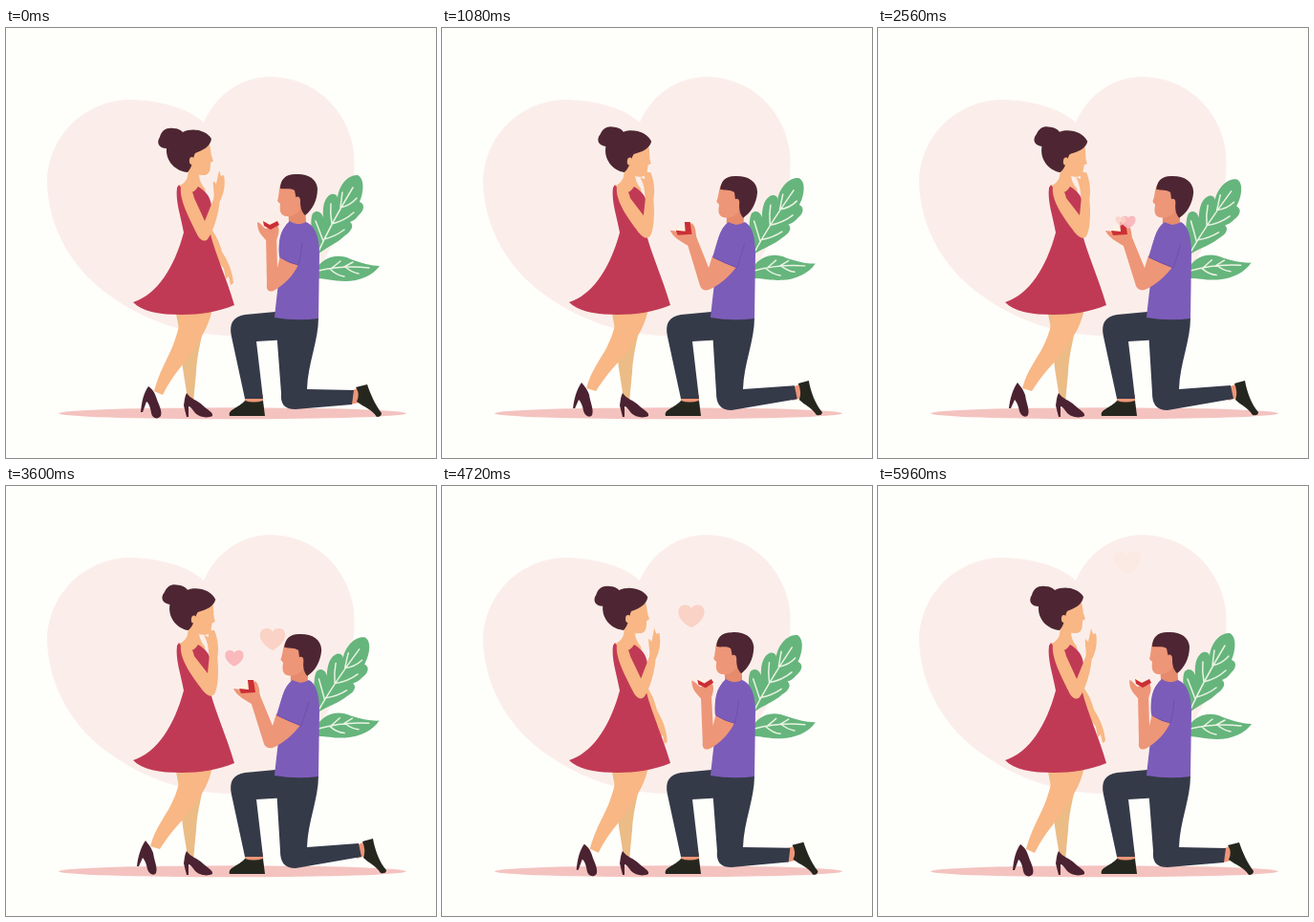
Write an HTML page that moves like this. It is 450x450 px and loops after 6000 ms.

```html
<!DOCTYPE html>
<html lang="en">
<head>
<meta charset="utf-8">
<title>Proposal</title>
<style>
  html, body { margin: 0; width: 100%; height: 100%; overflow: hidden; background: #fefefb; }
  svg { display: block; width: 100vw; height: 100vh; }
  .hair { fill: #4e2633; }
  .heel { fill: #4b2231; }
  .her { fill: #f8b784; }
  .him { fill: #ee9678; }
  .dress { fill: #c13a55; }
  .pants { fill: #353a49; }
  .shoe { fill: #25271f; }
  .shirt { fill: #7c5cb9; }
  .leaf { fill: #66b57c; }
  .vein { fill: none; stroke: #e9f3e2; stroke-width: 1.5; stroke-linecap: round; }
</style>
</head>
<body>
<svg viewBox="0 0 450 450">
  <path fill="#fbeeea" d="M207 99C190 83 158 75 127 75C80 77 43 115 43 163C45 213 72 255 110 281C145 306 188 321 235 322C282 314 323 268 348 214C359 188 367 160 364 130C358 84 321 51 276 51C242 52 218 73 207 99Z"/>
  <ellipse cx="237" cy="403.3" rx="182" ry="6" fill="#f4c3bf"/>

  <g id="leafTop">
    <path class="leaf" d="M326 237C321 222 317 202 321 194C326 189 331 194 332 198C331 185 334 177 340 174C344 173 347 175 347 178C348 165 358 153 368 154C376 158 374 173 370 182C376 184 375 191 369 196C366 200 363 202 360 203C365 207 361 213 355 217C347 225 336 229 326 237Z"/>
    <path class="vein" d="M326 236Q340 205 363 167M332 223Q328 212 324 202M341 205Q339 194 340 184M350 188Q351 179 352 172M333 221Q345 218 354 211M341 205Q354 202 364 193M350 188Q360 186 367 178"/>
  </g>
  <g id="leafLow">
    <path class="leaf" d="M326 250C335 238 349 236 361 242C372 246 382 249 391 249C384 259 370 265 355 265C342 265 334 262 326 262Z"/>
    <path class="vein" d="M327 254Q352 248 380 251M340 252L350 244M354 250L363 245M339 252Q346 259 354 260M355 250Q362 256 369 257"/>
  </g>

  <!-- man -->
  <path class="him" d="M250 384H269V393H250Z"/>
  <path class="him" id="ankle"/>
  <path class="shoe" id="backShoe"/>
  <path class="pants" id="backLeg"/>
  <path class="pants" d="M282 297L250 300C238 302 233 309 236 323L250 388H269L262 328L296 326L327 304Z"/>
  <path class="shoe" d="M250 390Q259 393 269 390L271 406L234 406C232 399 243 398 250 390Z"/>
  <g id="hisHead">
    <path fill="#e68b6c" d="M295 182L313 180L314 204Q304 211 296 203Z"/>
    <path class="him" d="M287 164C285 172 286 175 284 181L287 184C286 191 287 196 293 197C301 198 307 193 310 186L316 172L306 160Z"/>
    <path class="hair" d="M287 168C287 159 292 153 303 153C315 152 325 157 326 168C326 181 320 191 313 196C309 192 308 187 308 182L304 180L302 170C297 167 292 169 287 168Z"/>
    <ellipse class="him" cx="305" cy="181" rx="3" ry="4.5"/>
  </g>
  <path class="shirt" id="shirt"/>
  <path class="him" id="hisArm"/>
  <path class="shirt" id="sleeve"/>
  <path fill="none" stroke="#6f50aa" id="fold"/>
  <path fill="#fff3e0" id="cushion"/>
  <path class="him" id="hisHand"/>
  <path fill="#cb2f35" id="box"/>

  <!-- woman -->
  <path class="her" id="farArm" d="M207 204C215 208 222 219 226 234C231 242 237 253 238 267L235 269L233 260L230 263L228 252C219 240 212 228 207 204Z"/>
  <path fill="#ebbc86" d="M177 294H210C207 318 200 338 199 360L196 392H190C189 372 182 352 184 330Z"/>
  <path class="her" id="nearLeg"/>
  <path class="heel" id="nearHeel"/>
  <path class="heel" d="M189 382C194 389 200 389 206 395C211 400 217 402 216 406C210 409 202 407 198 403C195 399 193 396 191 396V407H189L186 395C187 389 187 386 189 382Z"/>
  <path class="her" d="M190 142L203 148C201 157 203 161 208 168L210 180H182L181 165C189 162 192 156 190 142Z"/>
  <path class="dress" d="M181 164C186 172 194 177 201 166C208 170 214 176 215 186C217 196 213 206 214 216C219 236 230 260 239 290C222 297 203 300 184 300C160 300 143 297 133 287C158 279 176 251 186 214C183 197 177 181 179 167Z"/>
  <g id="herHead">
    <path class="her" d="M193 128L213 122C215 130 214 132 217 139L214 141C214 149 213 154 207 154C199 155 193 149 191 142Z"/>
    <path class="hair" d="M168 126C160 126 157 120 161 114C163 107 168 104 175 105C180 105 183 107 185 109C195 104 210 107 215 116C214 124 206 128 198 131C195 136 196 145 190 151C178 150 167 140 168 126Z"/>
    <ellipse class="her" cx="194.500" cy="139" rx="2.600" ry="4"/>
  </g>
  <path class="her" id="herArm"/>
  <path class="her" id="herHand"/>

  <path id="pink" fill="#fab5ba"/>
  <path id="peach" fill="#fad1c4"/>
</svg>
<script>
const LOOP = 6000;
const el = id => document.getElementById(id);
const clamp = v => Math.max(0, Math.min(1, v));
const smooth = v => { v = clamp(v); return v * v * (3 - 2 * v); };
const lerp = (a, b, k) => a + (b - a) * k;

// Rest and offer poses; both paths of a pair share one command structure.
const poses = {
  shirt: [
    "M297 202Q304 208 314 203C324 207 328 220 328 236L327 304Q304 307 281 303C283 283 286 262 287 245C284 226 287 210 297 202Z",
    "M300 203Q307 209 317 203C325 207 328 220 328 236L327 304Q304 307 281 303C283 283 286 262 287 245C286 226 290 210 300 203Z"],
  sleeve: [
    "M297 204C308 205 313 218 309 231L306 248Q295 246 286 239C285 225 286 210 297 204Z",
    "M301 204C314 206 320 218 317 229L309 251Q295 246 283 240C288 225 290 211 301 204Z"],
  fold: ["M310 224Q309 238 306 248Q296 246 287 240", "M317 226Q313 238 309 251Q296 246 284 240"],
  hisArm: [
    "M287 238L306 247C302 258 290 270 280 275C275 277 272 274 273 268L272 216L283 215L284 251Z",
    "M283 238L309 249C301 260 289 270 279 274C275 275 272 274 270 270L255 222L265 217L279 251Z"],
  hisHand: [
    "M263 203C268 205 269 209 272 210L284 206C287 211 285 217 283 222L272 222C268 217 263 214 263 203Z",
    "M238 212C245 212 250 217 255 215L260 204C265 206 265 214 266 221L257 228C250 224 241 219 238 212Z"],
  box: [
    "M269 202L276 206L284 202L286 206L277 211L270 207Z",
    "M244 212L254 213L253 203L259 203L261 216L246 217Z"],
  cushion: [
    "M268 204L271 200L277 205L283 203L278 208L271 207Z",
    "M244 212L248 207L253 209L255 204L257 211L249 214Z"],
  ankle: [
    "M359 380L369 377L373 391L361 394Z",
    "M364 377L374 373L378 386L367 390Z"],
  backShoe: [
    "M366 376L378 373C381 382 386 394 393 403Q393 407 388 407C383 399 375 397 367 391Q371 383 366 376Z",
    "M373 372L384 369C386 381 391 394 398 402Q398 406 392 405C387 397 380 395 374 389Q377 381 373 372Z"],
  backLeg: [
    "M283 316L327 303C327 328 316 350 315 378L364 379L362 394L303 399C291 399 287 393 288 382Z",
    "M283 316L327 303C327 328 316 350 315 378L369 374L372 388L303 400C291 400 287 393 287 382Z"],
  nearLeg: [
    "M216 293C213 311 205 322 199 332C193 346 178 356 164 384L155 380C160 361 168 348 174 334C180 319 183 306 183 292Z",
    "M216 293C213 311 205 322 199 331C193 344 178 353 161 380L151 377C156 358 166 347 173 333C180 319 183 306 183 292Z"],
  nearHeel: [
    "M149 375C153 378 155 380 157 386C159 393 164 400 162 406C159 410 153 409 152 403C151 396 149 392 147 391L143 402L141 402C142 391 144 382 149 375Z",
    "M146 371C149 375 152 378 154 384C155 392 159 399 157 405C155 408 150 407 148 401C147 395 145 391 143 389L139 398L137 398C138 388 141 378 146 371Z"],
  herArm: [
    "M183 166C190 163 195 168 197 178L208 202L218 177L224 178C223 194 217 213 211 221C207 225 202 221 199 214C193 201 181 180 183 166Z",
    "M183 166C190 163 195 168 197 178L211 196L213 176L221 177C223 194 222 211 218 218C213 223 207 216 203 210C194 198 181 180 183 166Z"],
  herHand: [
    "M217 181C219 173 216 167 217 160L220 163L223 149L225 155L228 154C230 163 228 174 224 181Z",
    "M213 180C211 171 213 167 207 156L212 158L211 147L215 151L218 151C222 160 223 172 221 180Z"]
};

const mix = ([a, b], k) => {
  const ends = b.match(/[\d.]+/g);
  let i = 0;
  return a.replace(/[\d.]+/g, n => lerp(+n, +ends[i++], k).toFixed(2));
};

// Keys: time, x, y, width, opacity
const floats = {
  pink: [[1350, 235, 238, 4, 0], [1680, 232, 231, 13, .9], [2560, 262, 203, 15, .95],
         [3600, 239, 180, 19, .95], [4450, 246, 154, 20, 0]],
  peach: [[2300, 250, 208, 6, 0], [2560, 254, 202, 11, .8], [3600, 279, 160, 26, .95],
          [4720, 261, 136, 27, .95], [5960, 261, 80, 27, .2], [6000, 261, 78, 27, 0]]
};
const HEART = "M0 .46C-.68 .12-.58-.44-.25-.42C-.1-.42 0-.33 0-.27C0-.33 .1-.42 .25-.42C.58-.44 .68 .12 0 .46Z";
for (const id in floats) el(id).setAttribute("d", HEART);

function drawFloat(id, t) {
  const keys = floats[id];
  const i = keys.findIndex(k => k[0] > t);
  if (i < 1) return el(id).setAttribute("opacity", 0);
  const a = keys[i - 1], b = keys[i];
  const k = (t - a[0]) / (b[0] - a[0]);
  const [, , y, size, alpha] = a.map((v, n) => lerp(v, b[n], k));
  const x = lerp(a[1], b[1], smooth(k));
  el(id).setAttribute("transform", `translate(${x} ${y}) scale(${size})`);
  el(id).setAttribute("opacity", alpha);
}

const turn = (id, angle, x, y, dx = 0, dy = 0) =>
  el(id).setAttribute("transform", `translate(${dx} ${dy}) rotate(${angle} ${x} ${y})`);

function draw(t) {
  const p = smooth(t / 1200) - smooth((t - 3680) / 1240);
  const sway = smooth(t / 1600) - smooth((t - 3600) / 2200);
  for (const id in poses) el(id).setAttribute("d", mix(poses[id], p));
  turn("hisHead", 4 * p, 303, 200, 2 * p, 2 * p);
  turn("herHead", 6 * p, 190, 158);
  turn("farArm", 30 * p, 210, 206);
  turn("leafTop", 5.5 * sway, 326, 238);
  turn("leafLow", -3 * sway, 326, 256);
  for (const id in floats) drawFloat(id, t);
}

const start = performance.now();
(function tick() {
  draw((performance.now() - start) % LOOP);
  requestAnimationFrame(tick);
})();
</script>
</body>
</html>
```
